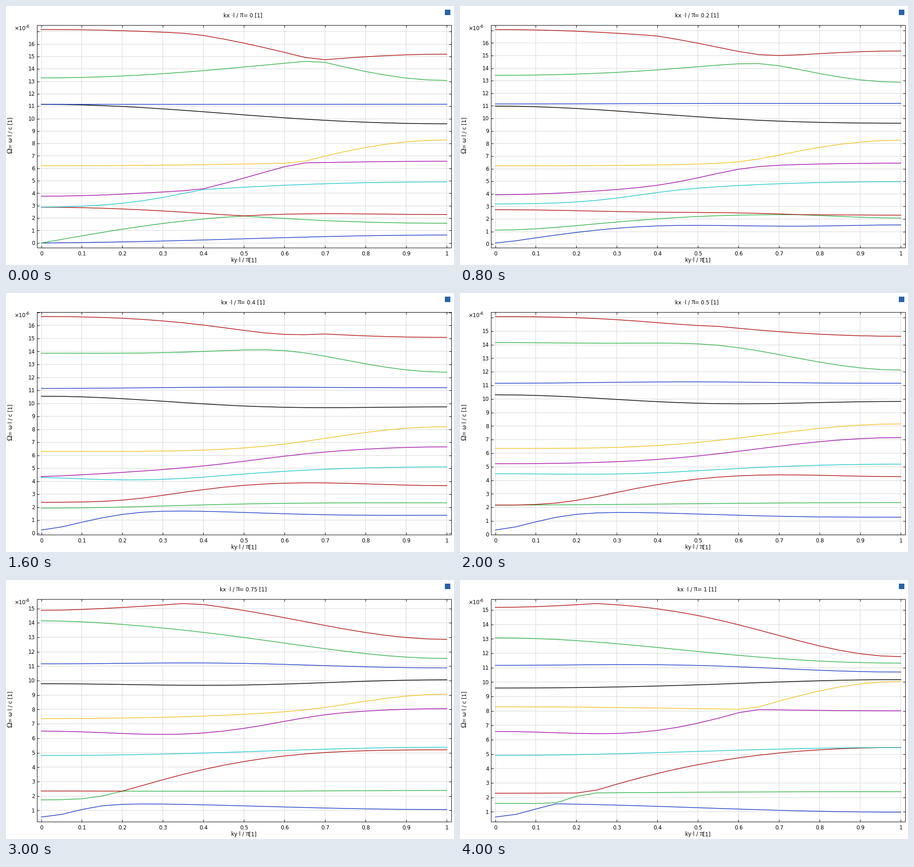
A matplotlib script that plays this animation: 983x569 px, repeating every 4.2 s.

```python
import numpy as np
import matplotlib.pyplot as plt
from matplotlib.animation import FuncAnimation
from matplotlib.patches import Rectangle

W, H, DPI = 983, 569, 100
PT = 72 / DPI
LEFT, RIGHT, TOP, BOTTOM = 67.5, 976.5, 41.5, 530.5
X0, X1, Y_LOW, Y_HIGH = 77.5, 967.2, 520.7, 51.7
STEPS = 21

BLUE, GREEN, RED = "#1f3fc8", "#32b34a", "#b21212"
CYAN, PURPLE, YELLOW = "#20c8cc", "#a510ac", "#f5c021"
COLORS = [BLUE, GREEN, RED, CYAN, PURPLE, YELLOW, "black", BLUE, GREEN, RED]

# Uncoupled waves: frequency at (kx, ky) = (0,0) (0,½) (0,1) (½,½) (½,1) (1,1)
WAVES = {
    "A": (0, .339, .64, 3.99, 4.275, 5.464),
    "B": (0, 2.18, 2.29, 2.28, 2.36, 2.398),
    "C": (2.88, 2.17, 1.59, 1.79, 1.285, .98),
    "D": (2.89, 5.225, 8.29, 6.21, 8.16, 8.01),
    "E": (3.765, 4.485, 4.915, 4.87, 5.194, 5.464),
    "F": (6.22, 6.353, 6.577, 6.32, 7.153, 10.05),
    "G": (11.15, 10.307, 9.59, 9.675, 9.815, 10.175),
    "H": (11.155, 11.155, 11.165, 11.29, 11.158, 10.7),
    "I": (13.28, 14.155, 15.19, 14.74, 16, 16.5),
    "J": (17.67, 16.075, 13.073, 14.74, 12.125, 11.32),
    "K": (17.17, 16.55, 15.57, 15.5, 14.62, 11.768),
}
# Waves that repel each other away from the symmetry lines
COUPLINGS = {"AC": 3.5, "DE": 4.6, "DF": 6.6, "FG": 3, "HJ": 8, "IJ": 20}


def dispersion():
    """Sorted frequencies over (kx, ky, band)."""
    k = np.linspace(0, 1, STEPS)
    c, s = np.cos(np.pi * k), np.sin(np.pi * k)
    basis = np.array([c * (c + 1) / 2, 1 - c * c, c * (c - 1) / 2])
    names = list(WAVES)
    matrix = np.zeros((STEPS, STEPS, len(names), len(names)))
    for n, (g, d, x, p, z, m) in enumerate(WAVES.values()):
        squares = np.array([[g, d, x], [d, p, z], [x, z, m]]) ** 2
        matrix[..., n, n] = basis.T @ squares @ basis
    for (first, second), strength in COUPLINGS.items():
        i, j = names.index(first), names.index(second)
        matrix[..., i, j] = matrix[..., j, i] = strength * np.outer(s, s)
    return np.sqrt(np.maximum(np.linalg.eigvalsh(matrix), 0))


bands = dispersion()[..., :len(COLORS)]

fig = plt.figure(figsize=(W / DPI, H / DPI), dpi=DPI, facecolor="white")
ax = fig.add_axes([0, 0, 1, 1])
ax.set_xlim(0, W)
ax.set_ylim(H, 0)
ax.axis("off")


def label(x, y, text, size=11.7, font="DejaVu Sans", **style):
    return ax.text(x, y, text, fontsize=size * PT, family=font,
                   va="baseline", rotation_mode="anchor", **style)


def serif(x, y, text, **style):
    return label(x, y, text, 16, "Liberation Serif", **style)


def strokes(color, width, zorder):
    return ax.plot([], [], color=color, lw=width * PT, zorder=zorder,
                   snap=True, solid_capstyle="butt")[0]


def set_segments(line, segments):
    """Show many separate (xa, ya, xb, yb) strokes with one line."""
    s = np.array(segments, float)
    gap = np.full(len(s), np.nan)
    line.set_data(np.c_[s[:, 0], s[:, 2], gap].ravel(),
                  np.c_[s[:, 1], s[:, 3], gap].ravel())


x_ticks = np.linspace(X0, X1, 11)
x_curve = np.linspace(X0, X1, STEPS)
grid_line = strokes("#e3e3e3", 1.5, 1)
tick_line = strokes("black", 1, 4)
curve_lines = [ax.plot([], [], color=color, lw=1.5 * PT, zorder=3)[0]
               for color in COLORS]
ax.add_patch(Rectangle((LEFT, TOP), RIGHT - LEFT, BOTTOM - TOP, fill=False,
                       ec="black", lw=PT, zorder=5, snap=True))
ax.add_patch(Rectangle((963, 7.5), 12, 12, color="#2a62a8", lw=0))

for i, x in enumerate(x_ticks):
    label(x + .3, 547.5, f"{i / 10:g}", ha="center")
y_labels = [label(63.5, 0, str(n), ha="right") for n in range(18)]

label(18.5, 53, "×10")
label(42.5, 48, "-6", 9)
label(494, 562, "ky·l / ")
serif(526, 562, "π")
label(533.5, 562, "[1]")
serif(13.5, 324, "Ω", rotation=90)
label(13.5, 313, "= ω·l / c [1]", rotation=90)
title = [label(0, 24, "kx ·l / "), serif(0, 24, "π"), label(0, 24, "")]


def draw(frame):
    rows = bands[frame].T
    low, high = rows.min(), rows.max()
    scale = (Y_LOW - Y_HIGH) / (high - low)

    def to_y(value):
        return Y_LOW - (value - low) * scale

    for line, row in zip(curve_lines, rows):
        line.set_data(x_curve, to_y(row))

    levels = []
    for n, text in enumerate(y_labels):
        y = to_y(n)
        inside = TOP < y < BOTTOM + .9
        if inside:
            levels.append(y)
        text.set_y(y + 4.2)
        text.set_visible(inside and y > 58)

    set_segments(grid_line, [(x, TOP, x, BOTTOM) for x in x_ticks]
                 + [(LEFT, y, RIGHT, y) for y in levels])
    set_segments(tick_line,
                 [(x, TOP, x, TOP + 5) for x in x_ticks]
                 + [(x, BOTTOM - 5, x, BOTTOM) for x in x_ticks]
                 + [(LEFT, y, LEFT + 5, y) for y in levels]
                 + [(RIGHT - 5, y, RIGHT, y) for y in levels])

    number = f"{round(frame / (STEPS - 1), 2):g}"
    left = 477.2 - 4.6 * np.log2(len(number))**.98 * (len(number) > 1) * .72 \
        if False else 477.2 - 3 * (len(number) - 1) + .6 * (len(number) > 1)
    for part, offset in zip(title, (0, 35.5, 43.5)):
        part.set_x(left + offset)
    title[2].set_text(f"= {number} [1]")
    return [*curve_lines, grid_line, tick_line, *y_labels, *title]


anim = FuncAnimation(fig, draw, frames=STEPS, interval=200, repeat=True,
                     repeat_delay=0, blit=False)
plt.show()
```
